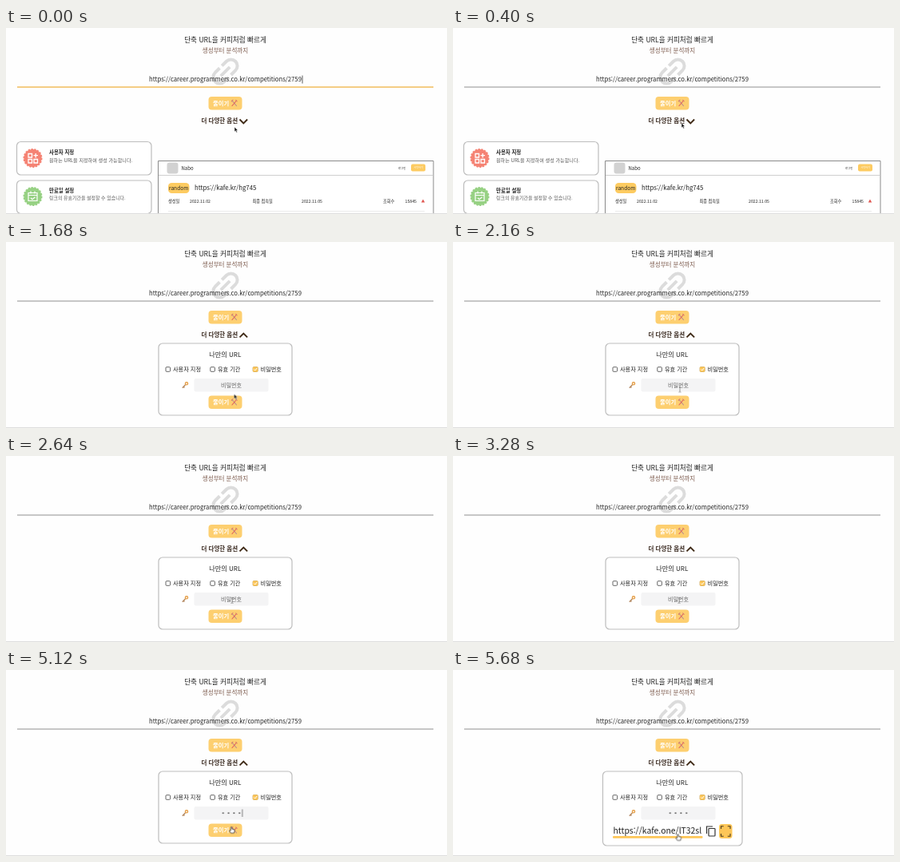
Animation, 552 px wide and 233 px high, one loop 5760 ms. Source, as an HTML page:

```html
<!DOCTYPE html>
<html lang="ko">
<head>
<meta charset="utf-8">
<title>URL shortener</title>
<style>
html, body { margin: 0; width: 100%; height: 100%; overflow: hidden; background: #fefefe; }
svg { display: block; width: 552px; height: 233px; }
text { font-family: "Noto Sans CJK KR", "Noto Sans CJK", "Noto Sans", sans-serif; fill: #222; white-space: pre; }
.mid { text-anchor: middle; }
.bold { font-weight: 700; }
.medium { font-weight: 500; }
.option { font-size: 7.2px; }
.small { font-size: 5.2px; }
.box { fill: #fff; stroke: #bdbdbd; stroke-width: 1.2; }
.tick { fill: #fff; stroke: #555; stroke-width: .9; }

/* 1% of the loop = 57.6 ms */
.line, .caret, .cards, .down, .up, .panel, .short, .long, .locked, .result,
.hint, .typed, .focus, .dot, .arrow, .beam, .hand {
  animation: 5760ms step-end infinite;
}
.line { animation-name: blur; animation-timing-function: linear; }
@keyframes blur { 0%, 2.778% { stroke: #f0bd5c; } 6.944%, 100% { stroke: #b4b4b4; } }
.caret { animation-name: caret; }
@keyframes caret { 0% { opacity: 1; } 4.167%, 100% { opacity: 0; } }
.cards { animation-name: push; }
@keyframes push {
  0% { transform: none; }
  9.722% { transform: translateY(74px); }
  22.222%, 100% { transform: translateY(96px); }
}
.down { animation-name: down; }
@keyframes down { 0% { opacity: 1; } 9.722%, 100% { opacity: 0; } }
.up, .panel { animation-name: open; }
@keyframes open { 0% { opacity: 0; } 9.722%, 100% { opacity: 1; } }
.short { animation-name: short; }
@keyframes short { 0%, 22.222%, 100% { opacity: 0; } 9.722% { opacity: 1; } }
.locked { animation-name: locked; }
@keyframes locked { 0% { opacity: 0; } 22.222%, 100% { opacity: 1; } }
.long { animation-name: long; }
@keyframes long { 0%, 97.222%, 100% { opacity: 0; } 22.222% { opacity: 1; } }
.result { animation-name: result; }
@keyframes result { 0% { opacity: 0; } 97.222%, 100% { opacity: 1; } }

.hint { animation-name: hint; }
@keyframes hint { 0% { opacity: 1; } 70.833%, 100% { opacity: 0; } }
.typed { animation-name: typed; }
@keyframes typed {
  0% { transform: none; }
  70.833% { transform: translateX(-3.4px); }
  75% { transform: translateX(-6.8px); }
  79.167% { transform: translateX(-10.2px); }
  80.556%, 100% { transform: translateX(-13.6px); }
}
.dot { animation-name: dot1; }
.d2 { animation-name: dot2; }
.d3 { animation-name: dot3; }
.d4 { animation-name: dot4; }
@keyframes dot1 { 0% { opacity: 0; } 70.833%, 100% { opacity: 1; } }
@keyframes dot2 { 0% { opacity: 0; } 75%, 100% { opacity: 1; } }
@keyframes dot3 { 0% { opacity: 0; } 79.167%, 100% { opacity: 1; } }
@keyframes dot4 { 0% { opacity: 0; } 80.556%, 100% { opacity: 1; } }
.focus { animation-name: focus; }
@keyframes focus {
  0% { opacity: 0; transform: none; }
  65.278% { opacity: 1; transform: none; }
  70.833% { opacity: 1; transform: translateX(3.4px); }
  75% { opacity: 1; transform: translateX(6.8px); }
  79.167% { opacity: 1; transform: translateX(10.2px); }
  80.556% { opacity: 1; transform: translateX(13.6px); }
  93.056%, 100% { opacity: 0; transform: none; }
}

.mouse { animation: mouse 5760ms ease-in-out infinite; }
@keyframes mouse {
  0%, 1.389% { transform: translate(286px, 124px); }
  6.944%, 9.722% { transform: translate(286px, 119px); }
  19.444%, 20.833% { transform: translate(315px, 155px); }
  29.167%, 31.944% { transform: translate(285.5px, 190.5px); }
  41.667%, 83.333% { transform: translate(283px, 181px); }
  93.056%, 100% { transform: translate(281.5px, 205.5px); }
}
.arrow { animation-name: arrow; }
@keyframes arrow { 0% { opacity: 1; } 36.111%, 100% { opacity: 0; } }
.beam { animation-name: beam; }
@keyframes beam { 0%, 70.833%, 87.5%, 100% { opacity: 0; } 36.111%, 83.333% { opacity: 1; } }
.hand { animation-name: hand; }
@keyframes hand { 0% { opacity: 0; } 87.5%, 100% { opacity: 1; } }
</style>
</head>
<body>
<svg viewBox="0 0 552 233">
  <defs>
    <g id="cut">
      <rect x="253.5" width="42" height="16.5" rx="4" fill="#fdcf70"/>
      <text class="bold" x="259" y="10.9" font-size="7.3" style="fill:#fff">줄이기</text>
      <g fill="none" stroke-width="1.1" stroke-linecap="round">
        <path d="M283 5L288.5 11.5" stroke="#b98a8f"/>
        <path d="M288.5 5L283 11.5" stroke="#e0605c"/>
        <path d="M282.3 5.8L284 4.2M287.7 4.3L289.2 5.8" stroke="#d9806c"/>
      </g>
    </g>
  </defs>

  <text class="mid medium" x="274.5" y="18.2" font-size="8.6">단축 URL을 커피처럼 빠르게</text>
  <text class="mid" x="274.5" y="30.6" font-size="7.5" style="fill:#7c5a4c">생성부터 분석까지</text>
  <g transform="translate(274.5 54.5) rotate(-45)" fill="none" stroke="#dcdcdc" stroke-width="4">
    <path d="M-2 -8H-10A8 8 0 0 0 -10 8H-2M2 -8H10A8 8 0 0 1 10 8H2M-8 0H8"/>
  </g>
  <text class="mid" x="274.5" y="67" font-size="7.7">https://career.programmers.co.kr/competitions/2759</text>
  <path class="caret" d="M371 59.5V69.5" stroke="#333" stroke-width=".8"/>
  <path class="line" d="M14 74H535" stroke-width="1.4"/>
  <use href="#cut" y="86"/>
  <text class="bold" x="244.5" y="119.3" font-size="7.5" style="fill:#3a2a20">더 다양한 옵션</text>
  <g fill="none" stroke="#3f2a16" stroke-width="1.9">
    <path class="down" d="M292.5 114.5L297.3 119.3L302.1 114.5"/>
    <path class="up" d="M292.5 119.3L297.3 114.5L302.1 119.3"/>
  </g>

  <g class="cards">
    <rect class="box" x="13.5" y="142.5" width="168.5" height="41.5" rx="5"/>
    <circle cx="33.5" cy="163" r="11" fill="#f58374" stroke="#f58374" stroke-width="2" stroke-dasharray="2.4 1.4"/>
    <g fill="none" stroke="#fff" stroke-width="1.3">
      <path d="M28 157.5h4.5v4.5h-4.5zM28 164.5h4.5v4.5h-4.5zM35 164.5h4.5v4.5h-4.5zM37.2 157v5.5M34.5 159.7h5.5"/>
    </g>
    <text class="bold" x="54" y="158.3" font-size="6.4">사용자 지정</text>
    <text x="54" y="167.6" font-size="6.1" style="fill:#555">원하는 URL을 지정하여 생성 가능합니다.</text>

    <rect class="box" x="13.5" y="191" width="168.5" height="41.5" rx="5"/>
    <circle cx="33.5" cy="211" r="11" fill="#97d184" stroke="#97d184" stroke-width="2" stroke-dasharray="2.4 1.4"/>
    <g fill="none" stroke="#fff" stroke-width="1.2">
      <path d="M28 206.5h11v10h-11zM28 209.5h11M31 204.5v3M36 204.5v3M31 213l2 1.8l3.5 -3.2"/>
    </g>
    <text class="bold" x="54" y="205.5" font-size="6.4">만료일 설정</text>
    <text x="54" y="215" font-size="5.95" style="fill:#555">링크의 유효기간을 설정할 수 있습니다.</text>

    <path d="M190.5 245V166.5H535V245" fill="#fff" stroke="#8a8a8a"/>
    <path d="M191 184.5H535" stroke="#c4c4c4" stroke-width=".8"/>
    <rect x="201.5" y="168.5" width="14" height="14" rx="3" fill="#d2d2d2"/>
    <text x="219.5" y="177.6" font-size="6">Nabo</text>
    <text x="491" y="176.6" font-size="3.4">로그인</text>
    <rect x="507" y="170.5" width="18" height="9" rx="2" fill="#fdcb61"/>
    <text class="mid" x="516" y="176.2" font-size="3.2" style="fill:#fff">시작하기</text>
    <rect x="203" y="194" width="26.5" height="13" rx="4.5" fill="#fdcb61"/>
    <text class="mid medium" x="216.2" y="202.8" font-size="6.6">random</text>
    <text x="236" y="203" font-size="7.8">https://kafe.kr/hg745</text>
    <g class="small">
      <text class="medium" x="203" y="218.8">생성일</text>
      <text x="230" y="218.8">2022.11.02</text>
      <text class="medium" x="308.5" y="218.8">최종 접속일</text>
      <text x="370" y="218.8">2022.11.05</text>
      <text class="medium" x="472" y="218.8">조회수</text>
      <text x="499.5" y="218.8">15845</text>
    </g>
    <path d="M519.8 218.5L522 214.5L524.2 218.5Z" fill="#e0524d"/>
    <path d="M203 229.5H524" stroke="#e6e6e6" stroke-width=".8"/>
  </g>

  <g class="short">
    <rect class="box" x="191" y="127" width="167" height="68.5" rx="5"/>
    <use href="#cut" y="171"/>
  </g>
  <g class="long">
    <rect class="box" x="191" y="127" width="167" height="90" rx="5"/>
    <use href="#cut" y="192.5"/>
  </g>
  <g class="result">
    <rect class="box" x="187.5" y="127" width="174.5" height="93" rx="5"/>
    <text x="200.5" y="204.8" font-size="10.4">https://kafe.one/lT32sl</text>
    <rect x="200" y="208" width="112.5" height="2.8" rx="1" fill="#fdc658"/>
    <g fill="none" stroke="#333" stroke-width="1.2">
      <path d="M317.5 205V196H325"/>
      <rect x="320" y="198.5" width="8" height="9.5" rx=".8"/>
    </g>
    <rect x="333" y="193" width="16.5" height="18" rx="3.5" fill="#fdc658"/>
    <path d="M335.5 199V195.8H338.7M343.8 195.8H347V199M347 205V208.2H343.8M338.7 208.2H335.5V205" fill="none" stroke="#4a3a20" stroke-width="1.1"/>
  </g>

  <g class="panel">
    <text class="mid medium" x="274.3" y="144.2" font-size="8.1">나만의 URL</text>
    <rect class="tick" x="200" y="156.7" width="5.6" height="5.6" rx="1"/>
    <text class="option" x="209" y="162">사용자 지정</text>
    <rect class="tick" x="255.8" y="156.7" width="5.6" height="5.6" rx="1"/>
    <text class="option" x="265" y="162">유효 기간</text>
    <rect class="tick" x="309.3" y="156.7" width="5.6" height="5.6" rx="1"/>
    <text class="option" x="318.5" y="162">비밀번호</text>
  </g>

  <g class="locked">
    <rect x="308.8" y="156.2" width="6.6" height="6.6" rx="1.2" fill="#fdc658"/>
    <path d="M310.2 159.5L311.7 161L314.2 158" fill="none" stroke="#fff" stroke-width="1"/>
    <g fill="none" stroke="#e6a04a" stroke-width="1.4">
      <path d="M224.8 178.6L220.8 182.8M222.2 181.3L223.5 182.6" stroke="#b58a62"/>
      <circle cx="226" cy="177.3" r="1.6"/>
    </g>
    <rect x="235.5" y="171" width="93" height="16.5" rx="2" fill="#f4f4f5"/>
    <text class="hint mid" x="282" y="181.8" font-size="7" style="fill:#666">비밀번호</text>
    <g class="typed" fill="#555">
      <circle class="dot" cx="285.4" cy="179.2" r="1"/>
      <circle class="dot d2" cx="292.2" cy="179.2" r="1"/>
      <circle class="dot d3" cx="299" cy="179.2" r="1"/>
      <circle class="dot d4" cx="305.8" cy="179.2" r="1"/>
    </g>
    <path class="focus" d="M282.2 174.5V184" stroke="#444" stroke-width=".7"/>
  </g>

  <rect y="232" width="552" height="1" fill="#dedede"/>

  <g class="mouse">
    <path class="arrow" d="M0 0V6L1.4 4.7L2.4 7L3.5 6.5L2.5 4.3H4.3Z" fill="#111" stroke="#fff" stroke-width=".5"/>
    <path class="beam" d="M-1.5 -3.5Q0 -3.5 0 -2.5Q0 -3.5 1.5 -3.5M0 -2.5V2.5M-1.5 3.5Q0 3.5 0 2.5Q0 3.5 1.5 3.5" fill="none" stroke="#777" stroke-width=".7"/>
    <path class="hand" d="M-.8 0.6Q0 -.6 .8 .6V3L3.8 3.8Q4.3 4.1 4 5.5L3.3 8H-.7L-2.7 5Q-2.2 4 -.8 5Z" fill="#fff" stroke="#222" stroke-width=".7"/>
  </g>
</svg>
</body>
</html>
```
